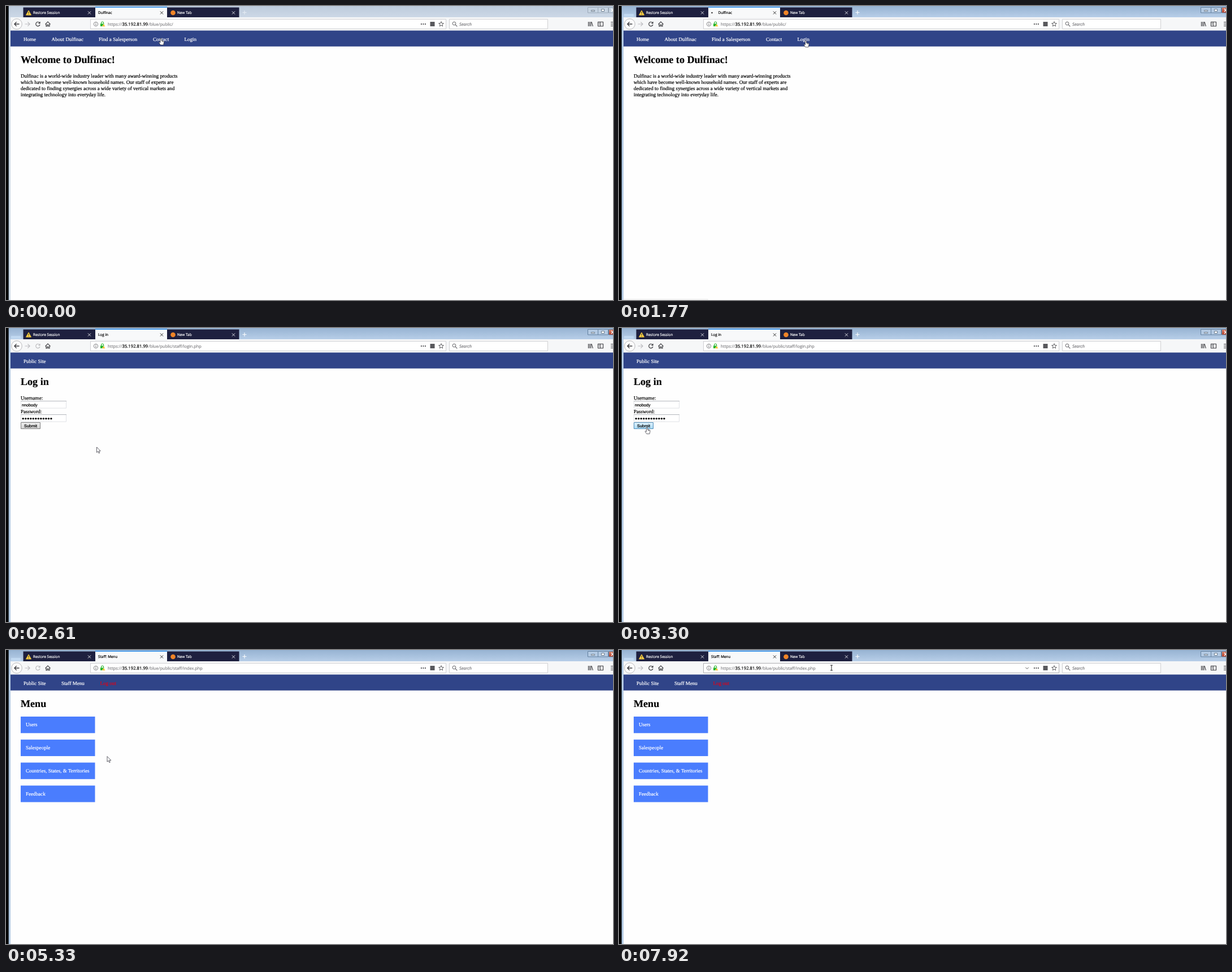
Animation of 1074x521 px, one loop 8000 ms. Source, as an HTML page with a canvas:

```html
<!DOCTYPE html>
<html lang="en">
<head>
<meta charset="utf-8">
<title>Browser session</title>
<style>
html, body { margin: 0; width: 100%; height: 100%; overflow: hidden; background: #fefefe; }
canvas { display: block; }
</style>
</head>
<body>
<canvas id="stage" width="1074" height="521"></canvas>
<script>
const ctx = document.getElementById('stage').getContext('2d');
ctx.textRendering = 'geometricPrecision';
ctx.lineJoin = 'round';

const LOOP = 8000;
const UI = '"Open Sans", "Noto Sans", sans-serif';
const SERIF = '"Liberation Serif", serif';
const ARIAL = '"Liberation Sans", sans-serif';
const INK = '#3b3b3f';

// Each entry changes part of the state from its time on.
const at = (cursor, x, y) => ({ cursor, x, y });
const events = [
  [0, { page: 'home', title: 'Dulfinac', path: '', button: 'reload', dot: 0, ...at('hand', 274, 57.3) }],
  [120, at('arrow', 291, 58)],
  [240, at('arrow', 312, 60)],
  [360, at('hand', 330, 60)],
  [520, at('hand', 338, 61)],
  [660, at('hand', 334, 61)],
  [780, at('hand', 330.5, 61.3)],
  [1770, { active: true, dot: 164.5, status: true }],
  [1930, { button: 'stop', dot: 171 }],
  [2070, { page: 'login', title: 'Log in', path: 'staff/login.php', dot: 164.5, status: false }],
  [2220, { dot: 168 }],
  [2350, { dot: 171 }],
  [2490, { dot: 0, button: 'wait', ...at('arrow', 240, 145) }],
  [2610, at('arrow', 160.5, 211)],
  [2770, at('arrow', 92, 204)],
  [2890, { button: 'reload', ...at('arrow', 44, 187) }],
  [3030, at('arrow', 43.5, 178)],
  [3180, { hover: true, ...at('hand', 47, 176) }],
  [3300, at('hand', 49.5, 176)],
  [4390, { dot: 164.5 }],
  [4510, { dot: 171 }],
  [4660, { button: 'stop', dot: 164.5 }],
  [4790, { dot: 168 }],
  [4930, { dot: 171, status: true }],
  [5050, { page: 'menu', title: 'Staff: Menu', path: 'staff/index.php', dot: 168, status: false }],
  [5170, { dot: 164.5 }],
  [5330, { dot: 0, button: 'wait', ...at('arrow', 179, 188.5) }],
  [5470, at('arrow', 190.5, 200.5)],
  [5630, at('arrow', 275, 229)],
  [5750, { button: 'reload', ...at('arrow', 380, 195) }],
  [5870, at('arrow', 436, 145)],
  [6010, at('arrow', 405, 95)],
  [6130, at('arrow', 376, 52)],
  [6290, at('arrow', 375, 248)],
  [6430, at('arrow', 362, 290)],
  [6550, at('arrow', 340, 340)],
  [6670, at('arrow', 318, 370)],
  [6790, at('')],
  [7100, at('arrow', 333, 349)],
  [7220, at('arrow', 352, 60)],
  [7370, at('arrow', 353, 58)],
  [7520, { urlHover: true, ...at('') }],
  [7920, at('beam', 376, 31.5)]
];

function box(x, y, w, h, fill, stroke) {
  if (fill) { ctx.fillStyle = fill; ctx.fillRect(x, y, w, h); }
  if (stroke) { ctx.lineWidth = 1; ctx.strokeStyle = stroke; ctx.strokeRect(x, y, w, h); }
}
function fade(y0, y1, c0, c1) {
  const g = ctx.createLinearGradient(0, y0, 0, y1);
  g.addColorStop(0, c0);
  g.addColorStop(1, c1);
  return g;
}
// The thin outline gives small text the weight of screen-hinted type.
function text(s, x, y, size, family, color, style = '') {
  ctx.font = `${style} ${size}px ${family}`;
  ctx.fillStyle = ctx.strokeStyle = color;
  ctx.lineWidth = 0.2;
  ctx.fillText(s, x, y);
  ctx.strokeText(s, x, y);
}
function path(d, stroke, width = 1, fill, x = 0, y = 0) {
  const p = new Path2D(d);
  ctx.save();
  ctx.translate(x, y);
  ctx.lineWidth = width;
  if (fill) { ctx.fillStyle = fill; ctx.fill(p); }
  if (stroke) { ctx.strokeStyle = stroke; ctx.stroke(p); }
  ctx.restore();
}
function disc(x, y, r, fill, stroke, width = 1) {
  ctx.beginPath();
  ctx.arc(x, y, r, 0, 7);
  if (fill) { ctx.fillStyle = fill; ctx.fill(); }
  if (stroke) { ctx.lineWidth = width; ctx.strokeStyle = stroke; ctx.stroke(); }
}
const cross = (x, y, r, color, width) =>
  path(`M${-r} ${-r}L${r} ${r}M${r} ${-r}L${-r} ${r}`, color, width, null, x, y);
const tabTitle = (s, x, color) => text(s, x, 14.2, 6.45, UI, color);

function titleBar(s) {
  box(4, 0, 1070, 521, s.active ? '#b5cce5' : '#d0dce8');
  box(4, 0, 1070, 20, s.active ? fade(0, 20, '#97b3d2', '#b7cee8') : fade(0, 20, '#bdcbdc', '#ccd8e6'));
  if (s.active) box(9, 14, 17, 5, '#c0d8f0');
  box(0, 0, 4, 521, '#000');
  box(4, 0, 1, 521, '#3a4651');

  box(30.5, 2.5, 382, 17.5, '#1e203f');
  box(158, 1.5, 127, 18.5, '#f8f9fa');
  box(158, 1.5, 127, 1.3, '#0a7be8');

  path('M40 8L44.5 16H35.5Z', '#f3c63a', 1, '#f7cf45');
  box(39.5, 10, 1, 3, '#333');
  box(39.5, 14, 1, 1, '#333');
  tabTitle('Restore Session', 48, '#fff');
  cross(147.5, 12, 2.6, '#d8d8e0', 1);
  if (s.dot) disc(s.dot, 12, 1.2, '#222');
  tabTitle(s.title, s.dot ? 175.5 : 163, '#000');
  cross(275.5, 12, 2.6, '#333', 1);
  disc(295.5, 12, 4.3, '#f08427');
  tabTitle('New Tab', 303, '#fff');
  cross(402.5, 12, 2.6, '#d8d8e0', 1);
  path('M418.5 11.5H425.5M422 8V15', s.active ? '#fff' : '#e6edf4', 1.1);

  const edge = s.active ? '#62809f' : '#9aa8b8';
  const glass = s.active ? '#b4cae3' : '#c7d4e2';
  box(1029.5, 2.5, 18, 9.5, glass, edge);
  box(1047.5, 2.5, 18, 9.5, glass, edge);
  box(1066.5, 2.5, 10, 9.5, s.active ? fade(2, 12, '#dc8d78', '#b83a22') : glass, edge);
  box(1035.5, 7.5, 6, 2, '#fff', '#6b7c8e');
  box(1053.5, 5.5, 5, 4, '#fff', '#6b7c8e');
  path('M1071 5L1076 10M1076 5L1071 10', '#fff', 1.5);
}

function reloadButton(kind) {
  if (kind === 'stop') return cross(56.5, 32, 3.6, INK, 1.3);
  const c = kind === 'wait' ? '#bcbcbf' : INK;
  path('M59.4 29.7A3.7 3.7 0 1 0 60 33', c, 1.2);
  path('M60.6 27.5V31.3H56.8Z', null, 1, c);
}

function toolBar(s) {
  box(8, 20, 1066, 24, '#f6f7f8');
  disc(19, 32, 9.3, '#fcfcfc', '#a9a9ad', 0.8);
  path('M23.5 32H15M18.6 28.3L14.9 32L18.6 35.7', INK, 1.3);
  path('M33.5 32H42M38.4 28.3L42.1 32L38.4 35.7', '#bcbcbf', 1.2);
  reloadButton(s.button);
  path('M69.5 32.3L74 27.8L78.5 32.3M71 31.5V36H73V33.4H75V36H77V31.5', INK, 1.2);

  box(149.5, 23.5, 629, 17, '#fff', s.urlHover ? '#adadb1' : '#cfcfd2');
  disc(159, 32, 3.7, null, '#68686c', 0.8);
  box(158.5, 31.3, 1, 2.8, '#68686c');
  box(158.5, 29.6, 1, 1, '#68686c');
  path('M168.6 31.5V30A2 2 0 0 1 172.6 30V31.5', '#26b52b', 1.1);
  box(167, 31.3, 6.5, 4.7, '#26b52b');
  path('M172.8 31.7L175.6 36.3H170Z', '#fff', 0.4, '#f5bd20');
  text('https://', 180, 34.9, 7.4, UI, '#858588');
  text('35.192.81.99', 205.5, 34.9, 7.7, UI, '#000');
  text('/blue/public/' + s.path, 252, 34.9, 7.35, UI, '#858588');
  if (s.urlHover) path('M719.3 30.8L722 33.5L724.7 30.8', '#555', 1);
  for (let i = 0; i < 3; i++) disc(734.9 + i * 3.5, 32, 1.1, INK);
  box(750.5, 28, 8, 8, '#58585c');
  let star = '';
  for (let i = 0; i < 10; i++) {
    const r = i % 2 ? 2 : 4.6, a = i * Math.PI / 5;
    star += `${i ? 'L' : 'M'}${r * Math.sin(a)} ${-r * Math.cos(a)}`;
  }
  path(star + 'Z', '#4c4c50', 0.9, null, 770, 32.2);

  box(784.5, 23.5, 174, 17, '#fff', '#cfcfd2');
  disc(793, 31, 2.9, null, '#66666a', 1);
  path('M795.2 33.2L798.3 36.3', '#66666a', 1.2);
  text('Search', 802, 34.9, 7.4, UI, '#77777b', 'italic');

  path('M1030.5 28V36M1032.7 28V36M1034.9 28V36M1036 28.2L1038.4 36', INK, 1.1);
  path('M1047.5 28.2H1056.5V35.8H1047.5ZM1051.3 28V36', INK, 1.1);
  path('M1048.8 30H1050.2M1048.8 32H1050.2', INK, 0.7);
  path('M1070 28.7H1074M1070 32H1074M1070 35.3H1074', INK, 1.1);
}

const body = (s, x, y, color = '#000') => text(s, x, y, 9.05, SERIF, color);
const heading = s => text(s, 26, 101, 18.1, SERIF, '#000', 'bold');

const pages = {
  home() {
    ['Home', 'About Dulfinac', 'Find a Salesperson', 'Contact', 'Login']
      .forEach((s, i) => body(s, [31, 80.5, 164, 260, 315.5][i], 62.3, '#fff'));
    heading('Welcome to Dulfinac!');
    ['Dulfinac is a world-wide industry leader with many award-winning products',
      'which have become well-known household names. Our staff of experts are',
      'dedicated to finding synergies across a wide variety of vertical markets and',
      'integrating technology into everyday life.']
      .forEach((s, i) => body(s, 26, 126.5 + i * 11.25));
  },
  login(s) {
    body('Public Site', 31, 62.3, '#fff');
    heading('Log in');
    body('Username:', 26, 126.5);
    body('Password:', 26, 150.7);
    for (const y of [129.5, 153.5]) {
      box(26.5, y, 80, 12.5, '#fff', '#e0e2e6');
      box(26, y - 0.5, 81, 1, '#b4b7bd');
    }
    text('nnobody', 28, 138.6, 7.2, ARIAL, '#000');
    for (let i = 0; i < 12; i++) disc(30.2 + i * 4.52, 160.6, 1.7, '#000');
    box(26.5, 167.5, 34, 11, s.hover ? fade(167, 179, '#e6f5fd', '#a5d8f4') : fade(167, 179, '#f3f3f3', '#cfcfcf'),
      s.hover ? '#4f8cb8' : '#808080');
    text('Submit', 32, 175.8, 7.4, ARIAL, '#000');
  },
  menu() {
    body('Public Site', 31, 62.3, '#fff');
    body('Staff Menu', 98, 62.3, '#fff');
    body('Log out', 166.5, 62.3, '#e00418');
    heading('Menu');
    ['Users', 'Salespeople', 'Countries, States, & Territories', 'Feedback'].forEach((s, i) => {
      const y = 118 + i * 40.75;
      box(26, y, 131.5, 29.3, '#4a7dfe');
      body(s, 35, y + 17.4, '#fff');
    });
  }
};

// Each cursor is drawn around its hot spot.
const cursors = {
  arrow: (x, y) => path('M0 0V9.6L2.2 7.6L3.8 11L5.3 10.3L3.8 7H6.8Z', '#3a3a44', 0.8, '#fff', x, y),
  hand: (x, y) => path('M-1 .6Q0-.4 1 .6V4L5 5Q5.8 5.4 5.6 6.5L4.6 11.6H-.6L-3.2 7.6Q-3.4 6.3-2.4 6.5L-1 7.7Z' +
    'M2.3 4.4V6.2M3.8 4.8V6.4', '#2c2c34', 0.7, '#fff', x, y),
  beam: (x, y) => path('M-2-4.5H2M0-4.5V4.5M-2 4.5H2', '#222', 1, null, x, y)
};

function draw(t) {
  const s = {};
  for (const [time, change] of events) if (time <= t) Object.assign(s, change);
  titleBar(s);
  toolBar(s);
  box(8, 44, 1066, 477, '#fefefe');
  box(8, 43.5, 1066, 28.2, '#304488');
  pages[s.page](s);
  if (s.status) box(8, 519.5, 149, 3, '#fafafa', '#ebebeb');
  if (s.cursor) cursors[s.cursor](s.x, s.y);
}

const start = performance.now();
function tick() {
  draw((performance.now() - start) % LOOP);
  requestAnimationFrame(tick);
}
tick();
</script>
</body>
</html>
```
